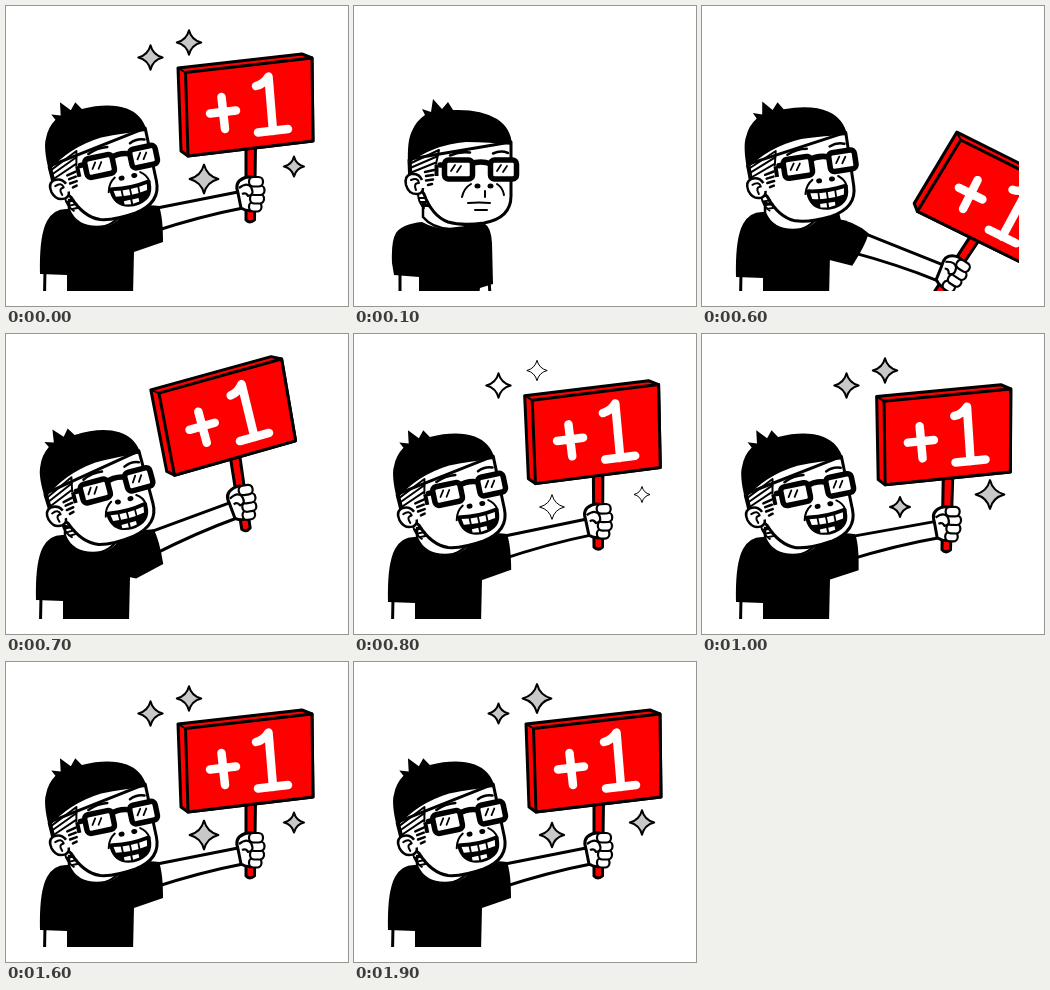
Write an HTML page that moves like this. It is 342x300 px and loops after 2000 ms.

```html
<!DOCTYPE html>
<html lang="en">
<head>
<meta charset="utf-8">
<title>Plus one</title>
<style>
  html, body { margin: 0; width: 100%; height: 100%; overflow: hidden; background: #fff; }
  svg { display: block; width: 100vw; height: 100vh; }
  .line { fill: none; stroke: #000; stroke-width: 2; stroke-linecap: round; stroke-linejoin: round; }
  .skin { fill: #fff; stroke: #000; stroke-width: 3; stroke-linejoin: round; }
  .red { fill: #f00; stroke: #000; stroke-width: 3; stroke-linejoin: round; }
  .frame { fill: #fff; stroke: #000; stroke-width: 5.5; stroke-linejoin: round; }
  .letter { fill: none; stroke: #fff; stroke-width: 8.5; stroke-linecap: round; stroke-linejoin: round; }
</style>
</head>
<body>
<svg viewBox="0 0 342 300">
  <clipPath id="edge"><rect width="317" height="285"/></clipPath>
  <g clip-path="url(#edge)">
    <g id="arm">
      <path class="skin" d="M146 203 L232 186 L237 202 Q195 210 146 226Z"/>
      <g id="sign" role="img" aria-label="+1">
        <path class="red" d="M240 140 H249.500 L248.500 214 Q244 218 240 214Z"/>
        <path class="red" d="M172 62 L296 48 L306 52 L307 135 L182 150 L175 145Z"/>
        <path class="red" d="M179.500 66.500 L306 52 L307 135 L182 150Z"/>
        <path class="line" stroke-width="3" d="M172 62 L179.500 66.500" />
        <path class="letter" d="M204 107.500 L230 104.500 M215.500 91 L219 123"/>
        <path class="letter" d="M250 80 Q258 78 262.500 70.500 L267 125 M252 126.500 L282 123"/>
      </g>
      <path class="skin" stroke-width="2.500" d="M232 187 Q228 176 238 172 Q246 169 250 174 L252 203 Q243 207 235 202Z"/>
      <g class="skin" style="stroke-width:2.200">
        <rect x="243" y="196" width="12.500" height="9.500" rx="4.500"/>
        <rect x="244" y="188" width="14" height="9.500" rx="4.500"/>
        <rect x="244" y="179.500" width="14.500" height="9.500" rx="4.500"/>
        <rect x="243" y="171" width="14" height="9.500" rx="4.500"/>
      </g>
      <path class="skin" style="stroke-width:2.200" d="M233 182 Q241 176 245 181 Q249 189 242 190 Q240 186 236 188"/>
      <path d="M116 206 Q135 197 153 200 Q157 211 157 236 L128 246 L112 240Z"/>
    </g>

    <g id="raised">
      <path class="skin" d="M39 264 L38.500 290 H64 V264Z"/>
      <path d="M62 203 Q48 202 41 215 Q33 230 34 268 L61 269 V290 H127 L128 245 L142 225 L137 203 L118 206 Q110 221 92 221 Q70 220 62 203Z"/>
      <path class="skin" style="stroke-width:2.500" d="M63 194 L63 204 Q70 221 91 221 Q108 221 117 205Z"/>
    </g>
    <g id="idle">
      <path class="skin" d="M46 268 V290 H68 V268Z M122 276 V290 H136 L135 274Z"/>
      <path d="M68 217 Q48 219 42 228 Q37 236 38 258 L40 270 L65 272 V290 H125 L126 283 L139 279 L138 238 Q137 222 131 219 L114 220 Q90 229 68 217Z"/>
      <path class="skin" style="stroke-width:2.500" d="M69 198 V212 Q78 223 96 224 L114 222Z"/>
    </g>

    <g id="head">
      <path class="skin" d="M56 155 L57 174 L70 190 Q78 212 94 218 Q108 222 130 219 Q157 214 157 192 V138Z"/>
      <path class="line" d="M64 189 Q64 198 70 204 M65 194 h7 M66 198 h8 M68 202 h7" />
      <path class="skin" style="stroke-width:2.500" d="M68 176 Q65 169 57 170 Q50 172 52 181 Q55 191 64 190 Q69 189 69 184"/>
      <path class="line" d="M57 176 Q64 173 65 179 Q59 179 62 186"/>
      <path d="M54 160 Q53 136 58 127 Q62 117 71 111 L68 105 L77 108 L79 95 L88 105 L94 98 L99 106 Q127 105 143 115 Q157 124 158 141 Q136 138 112 138 Q78 141 54 160Z"/>
      <path class="line" d="M55 160 L85 146 L82 160 M55 164.500 L84 152 M56 169 L82 158.500 M54.500 156 L55 170"/>
      <path class="line" style="stroke-width:2.500" d="M71 168 L80 166 M72 172 L79 171 M72 176.500 L79 175.500 M74 181 L78 180"/>
      <path class="line" style="stroke-width:4;stroke-linecap:butt" d="M82.500 161 V172"/>
      <path class="line" style="stroke-width:2.500" d="M96 151.500 Q106 147 116 148.500 M139 149.500 Q147 146 154 149"/>
      <path class="line" style="stroke-width:5.500" d="M86 161 H92 M116 160 Q127 156 137 160"/>
      <rect class="frame" x="90.500" y="156" width="28" height="19" rx="4"/>
      <rect class="frame" x="136.500" y="156" width="26" height="19" rx="4"/>
      <path class="line" style="stroke-width:1.800" d="M97 167 L101 161 M103 168 L107 162 M143 167 L147 161 M149 168 L153 162"/>
      <ellipse cx="123.500" cy="182" rx="3" ry="2.500"/>
      <ellipse cx="136.500" cy="182" rx="3" ry="2.500"/>
      <path class="line" d="M117 180 Q110 184 108 193 M143 180 Q149 184 150 191"/>
      <path id="closed" class="line" d="M114 199 Q125 198 136 199 M121 206 H133 M131 187 V193"/>
      <g id="open">
        <path d="M109 192 Q108 188 113 189 Q131 192 147 189 Q152 188 151 193 Q151 211 130 212 Q110 211 109 192Z"/>
        <path fill="#fff" d="M113 193 Q130 196 147 193 L146 199 Q130 202 114 199Z"/>
        <path class="line" style="stroke-width:1.800" d="M121 193 V201 M129.500 194 V202 M138 193 V201"/>
        <path fill="#fff" d="M121 205 H127.500 V209.500 L121 208.500Z M129.500 205 H136 V208.500 L129.500 209.500Z"/>
      </g>
    </g>
  </g>
  <g id="stars"></g>
</svg>
<script>
const STEP = 100, LOOP = 2000;
const part = id => document.getElementById(id);
const place = (id, x, y, turn = 0, px = 0, py = 0) =>
  part(id).setAttribute('transform', `translate(${x} ${y}) rotate(${turn} ${px} ${py})`);
const show = (id, on) => part(id).setAttribute('visibility', on ? 'visible' : 'hidden');

// start step, head [turn, x, y], body [x, y], arm [turn, x, y, slide] (no arm: standing idle)
const REST = [[-12, -7, 3], [0, 0], [0, 0, 0, 0]];
const POSES = [
  [0, ...REST],
  [1, [0, 0, -2], [0, -1]],
  [4, [0, 0, 0], [0, 0]],
  [5, [-4, -3, 3], [1, 5], [62, 8, 24, 5]],
  [6, [-8.5, -6, 2], [0, 3], [33, 8, 18, 5]],
  [7, [-15, -10, 2], [-4, -2], [-9, -3, -3, 0]],
  [8, [-12, -7, 3], [0, 0], [-0.5, 0, 0, 0]],
  [9, [-11, -6, 3], [0, 0], [3.5, 0, 1, 0]],
  [10, [-11.8, -7, 3], [0, 0], [1, 0, 0, 0]],
  [11, [-12.3, -7, 3], [0, 0], [-1, 0, 0, 0]],
  [12, [-12, -7, 3], [0, 0], [-0.4, 0, 0, 0]],
  [13, [-12, -7, 3], [0, 0], [0.4, 0, 0, 0]],
  [14, [-12, -7, 3], [0, 0], [0.2, 0, 0, 0]],
  [15, ...REST]
];

// centre and quarter-cycle offset
const STARS = [[144.5, 51.5, 0], [183, 36.5, 2], [198, 173, 1], [288, 160.5, 3]];
const starNodes = STARS.map(() => {
  const node = document.createElementNS('http://www.w3.org/2000/svg', 'path');
  node.setAttribute('stroke', '#000');
  node.setAttribute('stroke-linejoin', 'round');
  return part('stars').appendChild(node);
});

function drawStars(step) {
  const fresh = step === 8;
  show('stars', step === 0 || step >= 8);
  STARS.forEach(([x, y, offset], i) => {
    const small = fresh && i > 0;
    const r = 12.2 + 2.2 * Math.sin((step + offset) * Math.PI / 2) - (small ? 2 : 0);
    const c = r * 0.2;
    const node = starNodes[i];
    node.setAttribute('d', `M${x} ${y - r}Q${x + c} ${y - c} ${x + r} ${y}Q${x + c} ${y + c} ${x} ${y + r}Q${x - c} ${y + c} ${x - r} ${y}Q${x - c} ${y - c} ${x} ${y - r}Z`);
    node.setAttribute('fill', fresh ? '#fff' : '#c8c8c8');
    node.setAttribute('stroke-width', small ? 1 : 2);
  });
}

function draw(step) {
  const [, head, body, arm] = POSES.filter(pose => pose[0] <= step).pop();
  const up = !!arm;
  place('head', head[1], head[2], head[0], 62, 180);
  place(up ? 'raised' : 'idle', ...body);
  if (up) {
    place('arm', arm[1], arm[2], arm[0], 140, 214);
    place('sign', 0, arm[3]);
  }
  for (const id of ['arm', 'raised', 'open']) show(id, up);
  for (const id of ['idle', 'closed']) show(id, !up);
  drawStars(step);
}

const start = performance.now();
let last = -1;
function tick() {
  const step = Math.floor(((performance.now() - start) % LOOP) / STEP);
  if (step !== last) draw(last = step);
  requestAnimationFrame(tick);
}
tick();
</script>
</body>
</html>
```
